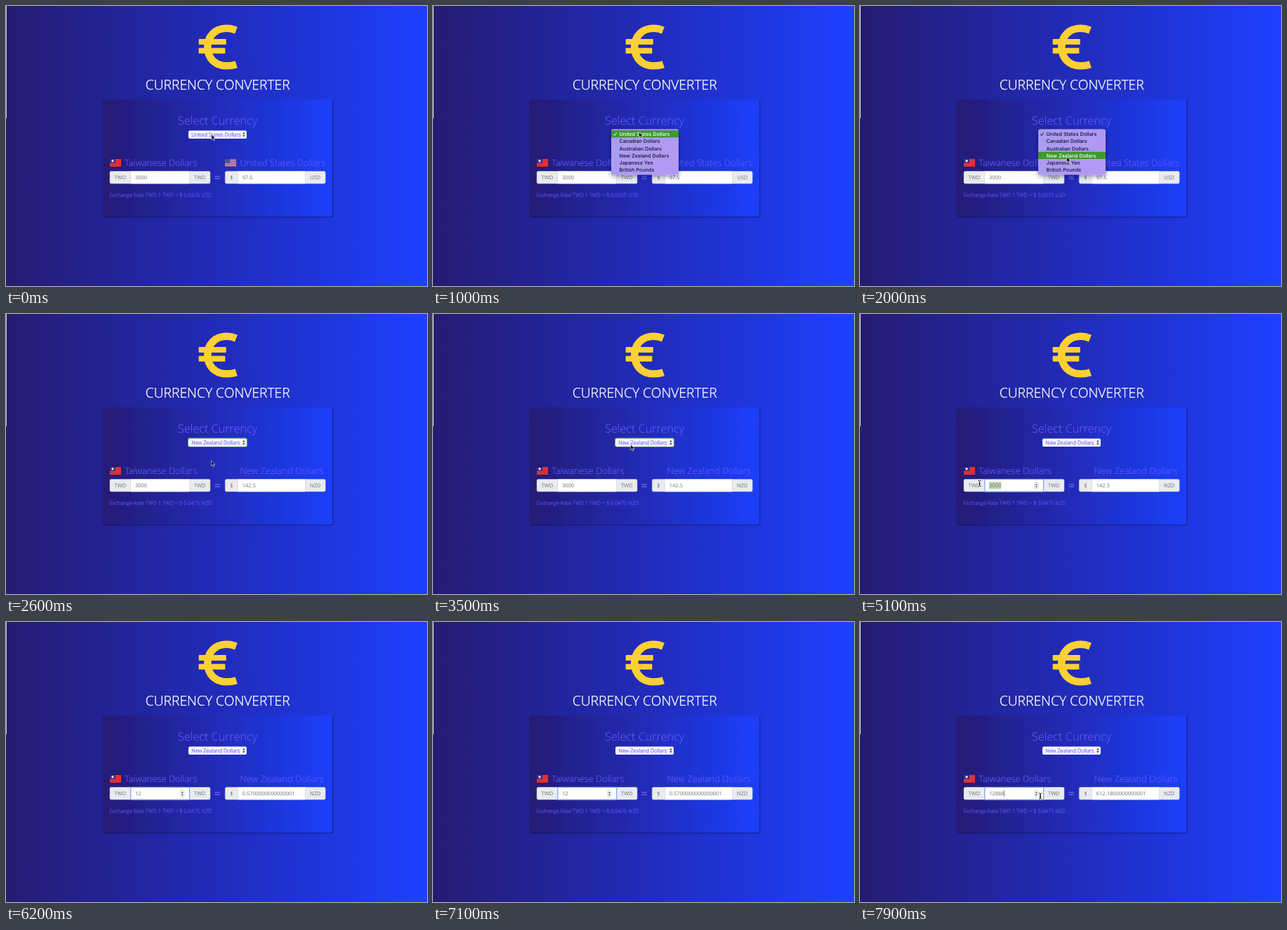
These frames come from a looping animation (600x399 px, 8000 ms). An HTML page:

```html
<!DOCTYPE html>
<html lang="en">
<head>
<meta charset="utf-8">
<title>Currency converter</title>
<style>
  html, body { margin: 0; width: 100%; height: 100%; overflow: hidden; background: #2029b8; }
  svg { display: block; width: 100vw; height: 100vh; }
  text { font-family: "Open Sans", "Noto Sans", sans-serif; font-weight: 300; white-space: pre; text-rendering: geometricPrecision; }
  .mid { text-anchor: middle; }
  .title { font-size: 19.25px; fill: #fff; stroke: #fff; stroke-width: .35px; }
  .violet { fill: #6157fa; stroke: #6157fa; stroke-width: .2px; }
  .field { font-size: 7.5px; font-weight: 400; fill: #6b7076; }
  .small { font-size: 7.5px; }
  .heading { font-size: 12.95px; }
  #menu text { font: 500 7.2px Inter, Roboto, sans-serif; }
</style>
</head>
<body>
<svg viewBox="0 0 600 399" preserveAspectRatio="none">
  <defs>
    <linearGradient id="page">
      <stop offset="0" stop-color="#251b72"/>
      <stop offset=".5" stop-color="#212bb9"/>
      <stop offset="1" stop-color="#1d40ff"/>
    </linearGradient>
    <linearGradient id="panel">
      <stop offset="0" stop-color="#251b74"/>
      <stop offset=".5" stop-color="#212bb8"/>
      <stop offset="1" stop-color="#1c3ffb"/>
    </linearGradient>
    <linearGradient id="glass" x2="1" y2=".3">
      <stop offset="0" stop-color="#a99cf0"/>
      <stop offset="1" stop-color="#b199f4"/>
    </linearGradient>
    <filter id="edge" x="-5%" y="-5%" width="110%" height="110%">
      <feDropShadow dx="1.2" dy=".9" stdDeviation=".4" flood-color="#14124f" flood-opacity=".8"/>
    </filter>
    <filter id="float" x="-20%" y="-20%" width="140%" height="150%">
      <feDropShadow dx="0" dy="2" stdDeviation="3" flood-color="#0b0b40" flood-opacity=".45"/>
    </filter>
  </defs>

  <rect width="600" height="399" fill="url(#page)"/>
  <rect width="1" height="160" fill="#c8c8d2"/>

  <g fill="none" stroke="#fdd033">
    <path stroke-width="10.6" d="M328 34.6C322.5 32.4 318 31.8 314 31.8C298 32 287.3 43 287.3 58.5C287.3 74 298 85.2 314 85.3C319 85.3 324 84.6 328.3 83.2"/>
    <path fill="#fdd033" stroke-width="2" stroke-linejoin="round" d="M275.6 48.1H312.8V54H275.6ZM275.6 60.8H311.4V66.7H275.6Z"/>
  </g>
  <text class="mid title" x="301.7" y="118.7">CURRENCY CONVERTER</text>

  <rect x="137.5" y="133" width="327.7" height="167.3" rx="2" fill="url(#panel)" filter="url(#edge)"/>
  <text class="mid violet" x="301.6" y="168.8" font-size="16.2">Select Currency</text>

  <rect id="selectRing" x="259" y="176.6" width="85" height="13" rx="2.5" fill="#5aa64b"/>
  <rect x="260" y="177.4" width="83" height="11.5" rx="2" fill="#f6f6fb"/>
  <text id="selectLabel" class="small violet" x="264.3" y="185.9"></text>
  <path fill="#444" d="M337.2 182.4L338.9 179.6L340.6 182.4ZM337.2 184L338.9 186.8L340.6 184Z"/>

  <g id="flagLeft">
    <rect x="148" y="218" width="16" height="11" fill="#e0302f"/>
    <rect x="148" y="218" width="8" height="5.5" fill="#1f2f9c"/>
    <circle cx="152" cy="220.7" r="1.6" fill="#fff"/>
  </g>
  <g id="flagRight"></g>

  <text class="violet heading" x="169" y="228">Taiwanese Dollars</text>
  <text id="target" class="violet heading" x="333.5" y="228"></text>

  <g id="groups"></g>
  <rect id="focus" x="177.8" y="235.5" width="83.8" height="17.6" fill="none" stroke="#7ea0ff" stroke-width="1.2"/>
  <rect id="selection" x="183.8" y="239.2" width="17.4" height="10.4" fill="#bfd6b5"/>
  <text id="amount" class="field" x="183.9" y="247.1"></text>
  <rect id="caret" y="239.3" width=".6" height="10" fill="#333"/>
  <g id="spinner">
    <rect x="248.6" y="239.4" width="5.4" height="10.4" rx="2.4" fill="#f4f4f4" stroke="#bbb" stroke-width=".5"/>
    <path fill="#555" d="M249.8 243.8L251.3 241.4L252.8 243.8ZM249.8 245.4L251.3 247.8L252.8 245.4Z"/>
  </g>
  <text id="result" class="field" x="336.8" y="247.1"></text>
  <text id="unit" class="field mid" x="440.8" y="247.1"></text>
  <text class="mid" x="301.3" y="249.6" font-size="16" fill="#6d63f5" style="font-weight:600">=</text>
  <text id="rate" class="violet small" x="147.7" y="271.7"></text>

  <g id="menu">
    <rect x="254" y="175.4" width="96" height="65.2" rx="2.5" fill="url(#glass)" filter="url(#float)"/>
    <rect id="highlight" x="254" width="96" height="10.2" fill="#3c9a2e"/>
  </g>

  <path id="arrow" fill="#000" stroke="#fff" stroke-width=".6" d="M0 0V7.6L1.8 6L3 8.9L4.3 8.3L3.1 5.5H5.4Z"/>
  <g id="beam" fill="none" stroke-linecap="round">
    <path id="beamLine" stroke="#fff" stroke-width="1.7" d="M-1.8 -4.2Q0 -4.2 0 -3V3Q0 4.2 -1.8 4.2M1.8 -4.2Q0 -4.2 0 -3V3Q0 4.2 1.8 4.2M-1 1H1"/>
    <path stroke="#111" stroke-width=".9" d="M-1.8 -4.2Q0 -4.2 0 -3V3Q0 4.2 -1.8 4.2M1.8 -4.2Q0 -4.2 0 -3V3Q0 4.2 1.8 4.2M-1 1H1"/>
  </g>
</svg>

<script>
const LOOP = 8000;
const NS = "http://www.w3.org/2000/svg";
const $ = id => document.getElementById(id);

function add(parent, tag, attrs, text = "") {
  const node = document.createElementNS(NS, tag);
  for (const key in attrs) node.setAttribute(key, attrs[key]);
  node.textContent = text;
  parent.append(node);
  return node;
}

const show = (id, on) => { $(id).style.display = on ? "" : "none"; };
const write = (id, text) => { if ($(id).textContent !== text) $(id).textContent = text; };

const names = ["United States Dollars", "Canadian Dollars", "Australian Dollars",
  "New Zealand Dollars", "Japanese Yen", "British Pounds"];
const rowTop = 177.2, rowStep = 10.2;

const items = names.map((name, i) =>
  add($("menu"), "text", { x: 265.5, y: rowTop + 8 + i * rowStep }, name));
const check = add($("menu"), "path",
  { d: "M257.2 182.7L258.8 184.7L261.6 180.2", fill: "none", "stroke-width": 1 });

// Input groups: prefix label, white field, suffix label
function inputGroup(x, fieldX, suffixX, end, prefix, suffix) {
  const g = $("groups"), y = 235.5, height = 17.6;
  const line = { stroke: "#c6cad2", "stroke-width": .5 };
  add(g, "rect", { x, y, width: end - x, height, rx: 2, fill: "#e9ebee", ...line });
  add(g, "rect", { x: fieldX, y, width: suffixX - fieldX, height, fill: "#fff", ...line });
  const label = (cx, text) => add(g, "text", { class: "field mid", x: cx, y: 247.1 }, text);
  label((x + fieldX) / 2, prefix);
  label((suffixX + end) / 2, suffix);
}
inputGroup(148, 177.8, 261.6, 291, "TWD", "TWD");
inputGroup(312.3, 330.3, 426.5, 455.2, "$", "");

for (let i = 0; i < 13; i++)
  add($("flagRight"), "rect", { x: 312, y: 218 + i * .84, width: 16, height: .86, fill: i % 2 ? "#e6dcec" : "#c8344c" });
add($("flagRight"), "rect", { x: 312, y: 218, width: 7.5, height: 5.9, fill: "#39468f" });
for (let i = 0; i < 12; i++)
  add($("flagRight"), "circle", { cx: 313 + i % 4 * 1.8, cy: 219.2 + Math.floor(i / 4) * 1.7, r: .3, fill: "#fff" });

// Pointer stops: time, x, y
const route = [[0, 292.8, 183], [500, 293.5, 180], [1100, 293.6, 179.5], [1900, 294.7, 215.5],
  [2400, 294.7, 213], [3200, 281.7, 186], [3600, 281.7, 186], [4200, 214, 243],
  [4500, 214, 243], [5000, 170.5, 241.5], [7600, 170.5, 241.5], [7900, 257, 248]];

function pointerAt(t) {
  const next = route.findIndex(stop => stop[0] > t);
  if (next < 0) return route.at(-1).slice(1);
  const [t0, x0, y0] = route[next - 1], [t1, x1, y1] = route[next];
  const p = (t - t0) / (t1 - t0), e = p * p * (3 - 2 * p);
  return [x0 + (x1 - x0) * e, y0 + (y1 - y0) * e];
}

const keys = [[0, "3000"], [5600, "1"], [5900, "12"], [7300, "128"], [7500, "1288"], [7700, "12888"]];

function render(t) {
  const [x, y] = pointerAt(t);
  const open = t >= 500 && t < 2500;
  const changed = t >= 2500;
  const focused = t >= 4300;
  const typing = t >= 5500;
  const name = names[changed ? 3 : 0], code = changed ? "NZD" : "USD", rate = changed ? .0475 : .0325;
  const amount = keys.filter(key => key[0] <= t).at(-1)[1];

  write("selectLabel", name);
  write("target", name);
  write("unit", code);
  write("rate", `Exchange Rate TWD 1 TWD = $ ${rate} ${code}`);
  write("amount", amount);
  write("result", String(amount * rate));
  show("flagRight", !changed);
  show("selectRing", changed && !focused);

  show("menu", open);
  const row = Math.max(0, Math.min(5, Math.floor((y - rowTop) / rowStep)));
  $("highlight").setAttribute("y", rowTop + row * rowStep);
  items.forEach((item, i) => item.setAttribute("fill", i === row ? "#fff" : "#15112b"));
  check.setAttribute("stroke", row ? "#15112b" : "#fff");

  show("focus", focused);
  show("spinner", focused);
  const reach = Math.max(0, Math.min(17.4, 201.2 - x));
  const drag = t >= 4500 && !typing ? reach : 0;
  $("selection").setAttribute("x", 201.2 - drag);
  $("selection").setAttribute("width", drag);
  show("caret", typing && (t < 6100 || t >= 7300));
  $("caret").setAttribute("x", 184.1 + amount.length * 4.29);

  const overField = t >= 4000;
  show("arrow", !overField);
  show("beam", overField && (!typing || t >= 7800));
  for (const id of ["arrow", "beam"]) $(id).setAttribute("transform", `translate(${x} ${y})`);
}

const start = performance.now();
function tick() {
  render((performance.now() - start) % LOOP);
  requestAnimationFrame(tick);
}
tick();
</script>
</body>
</html>
```
